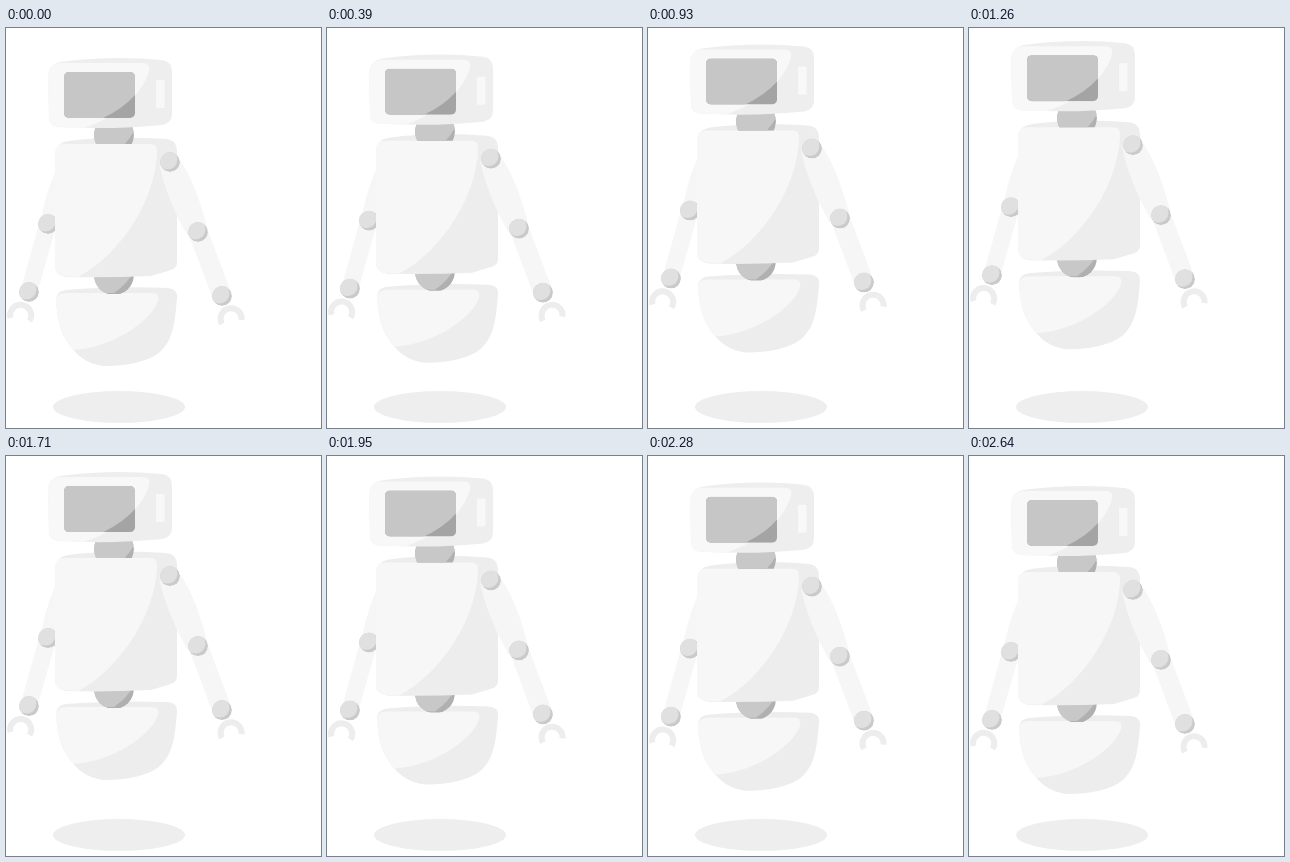
Animation of 315 by 400 pixels, one loop 2.67 s. Source, as an HTML page:

```html
<!DOCTYPE html>
<html lang="en">
<head>
<meta charset="utf-8">
<title>Floating robot</title>
<style>
  html, body { margin: 0; width: 100%; height: 100%; overflow: hidden; background: #fff; }
  svg { display: block; width: 100%; height: 100%; }
</style>
</head>
<body>
<svg viewBox="0 0 315 400">
  <defs>
    <clipPath id="disc"><circle r="10"/></clipPath>
    <clipPath id="ball"><circle r="20"/></clipPath>
    <clipPath id="glass"><rect x="58" y="44" width="71" height="46" rx="5"/></clipPath>
    <g id="joint" clip-path="url(#disc)">
      <circle r="10" fill="#cacaca"/>
      <circle cx="-2.5" cy="-2.5" r="10" fill="#e0e0e0"/>
    </g>
    <g id="neck" clip-path="url(#ball)">
      <circle r="20" fill="#b0b0b0"/>
      <path d="M-20-20H20V-4Q14 8 0 18H-20Z" fill="#c8c8c8"/>
    </g>
  </defs>

  <ellipse cx="113" cy="379" rx="66" ry="16" fill="#eee"/>

  <g id="robot">
    <!-- left arm -->
    <path d="M54 134Q42 157 35 190L48 200 62 196V134ZM33 196 16 257 30 269 50 199Z" fill="#f6f6f6"/>
    <use href="#joint" x="42" y="196"/>
    <path d="M4.5 290A10.5 10.5 0 1 1 23.5 293" fill="none" stroke="#ededed" stroke-width="6"/>
    <use href="#joint" x="23" y="264"/>

    <!-- hips -->
    <path d="M50 271Q51 263 60 262Q108 258 162 260Q172 261 171 270C169 292 168 311 154 324C142 334 120 338 100 338C80 337 69 325 62 315C53 302 51 288 50 271Z" fill="#ededed"/>
    <path d="M50 272Q51 265 60 265H146Q154 265 152 273C145 294 105 320 67 322C54 307 51 289 50 272Z" fill="#f7f7f7"/>
    <svg y="240" width="315" height="26"><use href="#neck" x="108" y="7"/></svg>

    <!-- torso -->
    <path d="M49 126Q50 115 62 113Q108 107 160 111Q171 112 171 124V234Q171 240 165 242L145 248Q100 250 60 249Q49 247 49 238Z" fill="#ededed"/>
    <path d="M49 124Q50 116 58 116H145Q152 116 151 126C149 171 116 226 72 249L56 248Q49 246 49 238Z" fill="#f7f7f7"/>
    <svg y="90" width="315" height="26"><use href="#neck" x="108" y="17"/></svg>

    <!-- head -->
    <path d="M42 48Q43 36 54 34Q105 27 156 32Q166 33 166 44V86Q166 95 156 97Q108 102 52 99Q43 98 43 89Z" fill="#eee"/>
    <path d="M42 47Q43 36 54 35H136Q145 35 143 43C137 66 111 89 78 100L52 99Q43 98 43 89Z" fill="#f8f8f8"/>
    <g clip-path="url(#glass)">
      <path d="M58 44H129V90H58Z" fill="#a4a4a4"/>
      <path d="M58 44H129V67Q117 81 95 91H58Z" fill="#c6c6c6"/>
    </g>
    <rect x="150" y="52" width="8.500" height="28" rx="1" fill="#f8f8f8"/>

    <!-- right arm -->
    <path d="M153 136Q160 170 181 207L202 203Q191 157 174 132ZM183 207 207 271 225 264 202 203Z" fill="#f6f6f6"/>
    <use href="#joint" x="164" y="134"/>
    <use href="#joint" x="192" y="204"/>
    <path d="M216 296A10.500 10.500 0 1 1 235.500 292" fill="none" stroke="#ededed" stroke-width="6"/>
    <use href="#joint" x="216" y="268"/>
  </g>
</svg>
<script>
  const PERIOD = 2670, RISE = 17;
  const robot = document.getElementById('robot');

  function draw(now) {
    const phase = now % PERIOD / PERIOD;
    const lift = RISE * (1 - Math.cos(phase * 2 * Math.PI)) / 2;
    robot.setAttribute('transform', `translate(0 ${-lift})`);
  }

  const start = performance.now();
  function tick() {
    draw(performance.now() - start);
    requestAnimationFrame(tick);
  }
  tick();
</script>
</body>
</html>
```
